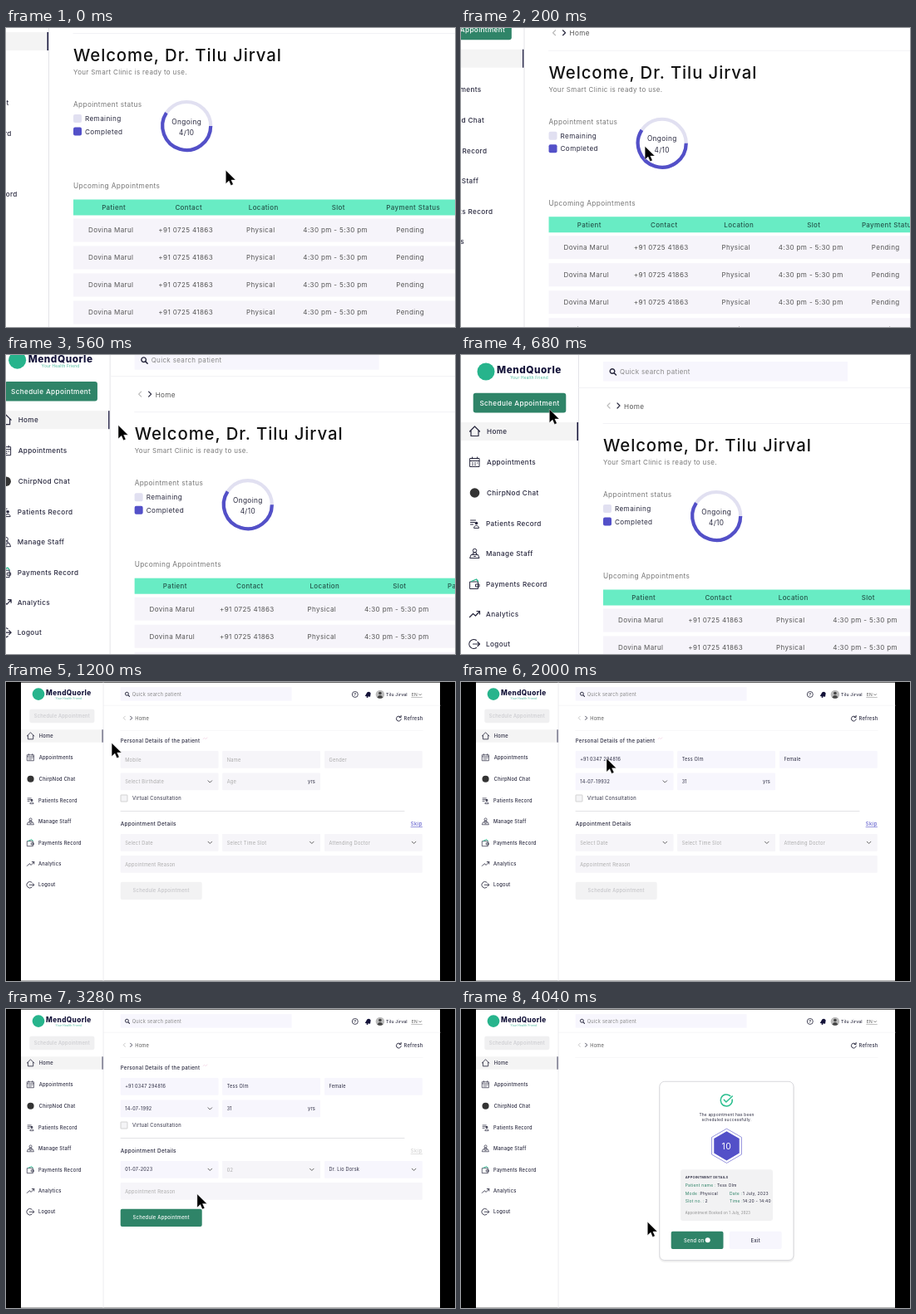
These frames come from a looping animation (540x360 px, 4640 ms). An HTML page:

```html
<!DOCTYPE html>
<html lang="en">
<head>
<meta charset="utf-8">
<title>Clinic appointment walkthrough</title>
<style>
  html, body { margin: 0; width: 100%; height: 100%; overflow: hidden; background: #000; }
  svg { display: block; width: 100%; height: 100%; }
  text { font-family: Inter, "Open Sans", sans-serif; letter-spacing: .045em; white-space: pre; }
</style>
</head>
<body>
<svg id="stage" viewBox="0 0 540 360" xmlns="http://www.w3.org/2000/svg"></svg>
<script>
const LOOP = 4640, STEP = 40, MOVE = 660;
const GREEN = '#2f8468', MINT = '#68ecc4', PURPLE = '#5350c8', NAVY = '#15143a';
const INK = '#29293f', GRAY = '#777', PALE = '#aaa', FIELD = '#f7f6fd', EMPTY = '#f6f5f9';
const DOCTOR = 'Tilu Jirval';

// y is the vertical middle of the lettering
const text = (x, y, str, size, fill = INK, weight = 400, anchor = 'start') =>
  `<text x="${x}" y="${(y + size * 0.35).toFixed(2)}" font-size="${(size * 0.95).toFixed(2)}" fill="${fill}" font-weight="${weight}" text-anchor="${anchor}">${str}</text>`;
const middle = (x, y, str, size, fill, weight) => text(x, y, str, size, fill, weight, 'middle');
const rect = (x, y, w, h, fill, r = 0, extra = '') =>
  `<rect x="${x}" y="${y}" width="${w}" height="${h}" rx="${r}" fill="${fill}" ${extra}/>`;
const dot = (x, y, r, fill) => `<circle cx="${x}" cy="${y}" r="${r}" fill="${fill}"/>`;
const line = (d, stroke = INK, width = 1) =>
  `<path d="${d}" fill="none" stroke="${stroke}" stroke-width="${width}" stroke-linecap="round" stroke-linejoin="round"/>`;
const at = (x, y, body) => `<g transform="translate(${x} ${y})">${body}</g>`;
const group = (id, body) => `<g id="${id}">${body}</g>`;
const ring = (r, stroke, width) => `<circle r="${r}" fill="none" stroke="${stroke}" stroke-width="${width}"/>`;

// Each icon is drawn around its own centre
const icons = {
  home: line('M-6 0 0-6 6 0M-4.5-1V5.5H4.5V-1', INK, 1.2),
  calendar: line('M-5.5-4.5H5.5V5.5H-5.5ZM-5.5-1.5H5.5M-3-6V-4M3-6V-4M-3 1H-2M0 1H1M3 1H3.5M-3 3.3H-2M0 3.3H1'),
  chat: dot(0, 0, 5.8, '#333'),
  records: line('M-5-4H1M-5-1.5H0M-5 1H-2M-1 5C-1 1.5 5 1.5 5 5Z') + dot(2, -0.5, 1.8, INK),
  staff: line('M-5.5 5.5H5.5L4 1.5H-4ZM-2 1.5V-1H2V1.5M-1 3.5H1') + `<circle cy="-3.5" r="2.2" fill="none" stroke="${INK}"/>`,
  wallet: line('M-5.5-3H4V5.5H-5.5ZM1.5 0H5.5V3H1.5Z') + line('M-4-3.5 2-6 4-3.5', '#28b58c', 1.3),
  chart: line('M-6 3.5-2-0.5 1 2 6-3.5M2.5-3.5H6V0', INK, 1.2),
  logout: line('M2-4.5A5.5 5.5 0 1 0 2 4.5M-2 0H6M3.5-2.5 6 0 3.5 2.5', INK, 1.2)
};
const menu = [
  ['home', 'Home', 92], ['calendar', 'Appointments', 129], ['chat', 'ChirpNod Chat', 166],
  ['records', 'Patients Record', 203], ['staff', 'Manage Staff', 239],
  ['wallet', 'Payments Record', 276], ['chart', 'Analytics', 312], ['logout', 'Logout', 348]
];

function sideButton(fill, color) {
  return rect(14.7, 45.8, 111.6, 23.6, fill, 3) + middle(70.5, 57.5, 'Schedule Appointment', 8.6, color, 500);
}

function frame() {
  const sidebar =
    dot(30, 20, 10.5, '#27b48c') + text(43, 18, 'MendQuorle', 12.4, NAVY, 800) +
    middle(82, 27.3, 'Your Health Friend', 5, '#45b99a') +
    rect(0, 81, 141, 22, '#f4f4f4') + rect(139.5, 81, 1.5, 22, NAVY) +
    line('M141.5 0V514', '#e4e4e8') +
    menu.map(([icon, label, y], i) => at(16.5, y, icons[icon]) + text(i < 3 ? 31 : 30, y, label, 8.6, INK, 500)).join('');
  const header =
    rect(171, 8, 294, 23.5, FIELD) +
    at(182, 19.5, ring(2.8, INK, 1.4) + line('M2.2 2.2 4.5 4.5', INK, 1.5)) +
    text(191, 20, 'Quick search patient', 8.4, '#888') +
    line('M142 39.5H720M171 82.5H690', '#f2f2f5') +
    at(574, 20.5, ring(5, INK, 1.2) + middle(0, 0, '?', 8, INK, 600)) +
    at(596, 20.5, `<path d="M-5 3-1-4Q3-6 5-2L4 4Z" fill="${NAVY}"/>` + dot(-1, 4.3, 1.4, NAVY)) +
    at(617, 20.5, dot(0, 0, 7.5, '#bbb') + dot(0, -2, 2.6, '#444') + '<path d="M-5 5Q0-2 5 5Q0 9-5 5Z" fill="#444"/>') +
    text(627, 20.5, DOCTOR, 7.6, INK, 500) + text(671, 21, 'EN', 7.5, '#555') +
    line('M671 25.5H689', '#777', 0.7) + line('M684 20 686 22 688 20', '#555') +
    line('M179 58 176 61 179 64', '#bbb', 1.2) + line('M188 58 191 61 188 64', INK, 1.2) +
    text(196, 61.5, 'Home', 8.6, '#555') +
    at(649, 62, line('M3.4-2.4A4.2 4.2 0 1 0 4.2 1M4-5V-2H1', INK, 1.4)) +
    text(658, 62, 'Refresh', 8.6, INK, 500);
  return rect(0, 0, 720, 513, '#fff') + sidebar + header;
}

function dashboard() {
  const heads = ['Patient', 'Contact', 'Location', 'Slot', 'Payment Status'];
  const cells = ['Dovina Marul', '+91 0725 41863', 'Physical', '4:30 pm - 5:30 pm', 'Pending'];
  const end = 213 * Math.PI / 180;
  const arc = `M29 0A29 29 0 1 1 ${29 * Math.cos(end)} ${29 * Math.sin(end)}`;
  let out =
    text(171, 108.8, `Welcome, Dr. ${DOCTOR}`, 21.4, '#111', 500) +
    text(171, 129, 'Your Smart Clinic is ready to use.', 8.4, GRAY) +
    text(171, 168, 'Appointment status', 8.7, GRAY) +
    rect(171, 180, 10, 10, '#e1e0f1', 2) + text(185, 185, 'Remaining', 8.6) +
    rect(171, 195.5, 10, 10, PURPLE, 2) + text(185, 200.5, 'Completed', 8.6) +
    at(307.2, 194, ring(29, '#e1e0f1', 4.2) +
      `<path d="${arc}" fill="none" stroke="${PURPLE}" stroke-width="4.2"/>` +
      middle(0, -5.5, 'Ongoing', 8.7) + middle(0, 8, '4/10', 8.7)) +
    text(171, 266, 'Upcoming Appointments', 8.7, GRAY) +
    rect(171, 282.5, 519, 19, MINT) +
    heads.map((h, i) => middle(219.7 + 90 * i, 292, h, 8.4, '#24544a', 500)).join('');
  for (let row = 0; row < 4; row++) {
    const y = 305.5 + 33 * row;
    out += rect(171, y, 519, 28, '#f6f4fa') +
      cells.map((c, i) => middle(216.2 + 90 * i, y + 14, c, 8.5, '#555')).join('');
  }
  return out;
}

function field(x, y, w, str, filled, chevron) {
  return rect(x, y, w, 20.7, filled ? FIELD : EMPTY, 1) +
    text(x + 5.5, y + 10.4, str, filled ? 5.8 : 6, filled ? INK : PALE) +
    (chevron ? line(`M${x + w - 12.5} ${y + 9.2}l2.3 2.3 2.3-2.3`, '#555', 0.9) : '');
}

function form(personal, visit) {
  const pick = (on, value, hint) => on ? value : hint;
  const [a, b, c] = [137.7, 260.2, 383], w = 117.8;
  return text(a, 71, 'Personal Details of the patient', 6.4, INK, 500) +
    line('M237 68.5q1.5-2 2.5-.5t2.5-1', '#f3d5e6', 0.8) +
    field(a, 83, w, pick(personal, '+91 0347 294816', 'Mobile'), personal) +
    field(b, 83, w, pick(personal, 'Tess Olm', 'Name'), personal) +
    field(c, 83, w, pick(personal, 'Female', 'Gender'), personal) +
    field(a, 109.6, w, pick(personal, visit ? '14-07-1992' : '14-07-19932', 'Select Birthdate'), personal, true) +
    field(b, 109.6, w, pick(personal, '31', 'Age'), personal) + text(363, 120, 'yrs', 6) +
    rect(138, 136, 8, 8, '#f4f4f6', 0.5, 'stroke="#bbb" stroke-width=".6"') +
    text(152, 140, 'Virtual Consultation', 6.1) +
    line('M138 155.5H479', '#dcdce0', 0.8) +
    text(a, 171, 'Appointment Details', 6.7, INK, 500) +
    text(486.5, 170.8, 'Skip', 6.8, visit ? '#ccc' : PURPLE) +
    line('M487 174.5H500.5', visit ? '#ccc' : PURPLE, 0.6) +
    field(a, 183, w, pick(visit, '01-07-2023', 'Select Date'), visit, true) +
    rect(b, 183, w, 20.7, visit ? FIELD : EMPTY) +
    field(b, 183, w, pick(visit, '02', 'Select Time Slot'), false, true) +
    field(c, 183, w, pick(visit, 'Dr. Lio Dorsk', 'Attending Doctor'), visit, true) +
    field(a, 209, 363.1, 'Appointment Reason', false) +
    rect(a, 240.7, 98, 21.3, visit ? GREEN : '#f2f2f3', 2) +
    middle(186.7, 251.3, 'Schedule Appointment', 6.1, visit ? '#fff' : '#c4c4c8', 500);
}

function confirmation() {
  const hexagon = (r, style) => `<polygon points="${
    [0, 1, 2, 3, 4, 5].map(i => [r * Math.sin(i * Math.PI / 3), -r * Math.cos(i * Math.PI / 3)].map(v => v.toFixed(2))).join(' ')
  }" ${style}/>`;
  const detail = (x, y, label, valueX, value) =>
    text(x, y, label, 5.3, GREEN) + text(valueX, y, value, 5.3, INK);
  return rect(238, 88, 163, 217, '#000', 7, 'opacity=".06"') +
    rect(238.8, 87.3, 161.2, 215.2, '#fff', 6, 'stroke="#d4d4d8" stroke-width=".9"') +
    at(319.3, 110, line('M4.5-5.4A7 7 0 1 0 6.9-1', '#2bbf8f', 1.5) + line('M-3-.8-.4 2 7-5', '#2bbf8f', 1.5)) +
    middle(319.5, 127.5, 'The appointment has been', 5.1) +
    middle(319.5, 133.6, 'scheduled successfully.', 5.1) +
    at(319.5, 164.8, hexagon(20.7, `fill="#fff" stroke="${PURPLE}" stroke-width=".6"`) +
      hexagon(17.6, `fill="${PURPLE}"`) + middle(0, 0.2, '10', 11, '#fff')) +
    rect(264, 193.3, 111, 61.7, '#f2f2f3', 3) +
    text(269.7, 202.2, 'APPOINTMENT DETAILS', 4.3, INK, 600) +
    detail(269.7, 212, 'Patient name :', 308, 'Tess Olm') +
    detail(269.7, 222, 'Mode :', 287.5, 'Physical') + detail(323, 222, 'Date :', 338.8, '1 July, 2023') +
    detail(269.7, 231.6, 'Slot no. :', 293.5, '2') + detail(323, 231.6, 'Time :', 338.8, '14:20 - 14:40') +
    text(269.7, 245, 'Appointment Booked on 1 July, 2023', 4.4, '#888') +
    rect(252.7, 267.7, 62.8, 21.3, GREEN, 2) + text(268, 278.4, 'Send on', 6.1, '#fff', 500) + dot(296.7, 278.3, 3, '#fff') +
    rect(322.7, 267.7, 63, 21.3, FIELD, 2) + middle(354.3, 278.4, 'Exit', 6.1, INK, 500);
}

const stage = document.getElementById('stage');
stage.innerHTML =
  group('page', frame() +
    group('dashboard', sideButton(GREEN, '#fff') + dashboard()) +
    group('disabled', sideButton('#f0f0f1', '#cbcbcf'))) +
  group('blank', form(false, false)) +
  group('personal', form(true, false)) +
  group('complete', form(true, true)) +
  group('booked', confirmation()) +
  group('cursor', '<path d="M0 0V16.2L3.8 12.7 6.2 18.2 9 17 6.6 11.7H11.8Z" fill="#000" stroke="#fff" stroke-width=".4"/>');
const part = id => document.getElementById(id);

const scenes = [[0, 'dashboard'], [1000, 'blank'], [2000, 'personal'], [3000, 'complete'], [4000, 'booked']];
const moves = [[20, 106.3, 65.3], [1000, 175, 92], [2000, 234, 198], [3000, 224.3, 256.3]];
const progress = (t, start) => Math.min(1, Math.max(0, (t - start) / MOVE));

function draw(t) {
  const scene = scenes.filter(([start]) => t >= start).pop()[1];
  const zoomed = scene === 'dashboard';
  for (const [, id] of scenes) part(id).style.display = id === scene ? '' : 'none';
  part('disabled').style.display = zoomed ? 'none' : '';

  const left = 1 - progress(t, 20);
  part('page').setAttribute('transform', zoomed
    ? `translate(${-90 * left} ${-76 * left})`
    : 'translate(18 .6) scale(.7)');

  let x = 264.3, y = 171.3;
  for (const [start, toX, toY] of moves) {
    const p = progress(t, start);
    x += (toX - x) * p;
    y += (toY - y) * p;
  }
  part('cursor').setAttribute('transform', `translate(${x} ${y})`);
}

function tick() {
  draw(Math.floor(performance.now() % LOOP / STEP) * STEP);
  requestAnimationFrame(tick);
}
tick();
</script>
</body>
</html>
```
